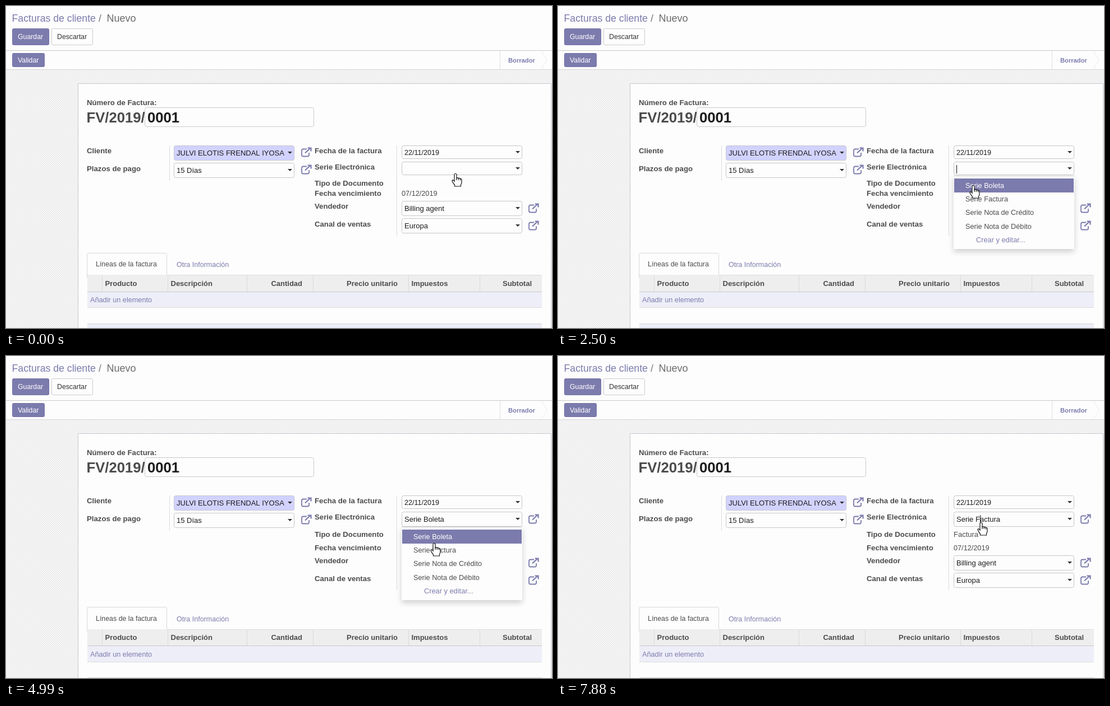
An HTML page with a canvas that plays this animation: 973 px wide and 575 px high, repeating every 8000 ms.

```html
<!DOCTYPE html>
<html lang="es">
<head>
<meta charset="utf-8">
<title>Factura</title>
<style>
  html, body { margin: 0; width: 100%; height: 100%; overflow: hidden; background: #fdfdfd; }
  canvas { display: block; }
</style>
</head>
<body>
<canvas id="stage" width="973" height="575"></canvas>
<script>
const ctx = document.getElementById("stage").getContext("2d");
const LOOP = 8000, TICK = 131.15, BLINK = 530;
const PURPLE = "#7c7bad", INK = "#4c4c4c", DARK = "#1c1c1c", WHITE = "#fdfdfd";

// Pointer path: tick, x, y of the hot spot
const path = [
  [0, 801, 299], [4, 766, 311], [7, 736, 289], [14, 736, 289], [17, 740, 320],
  [22, 740, 320], [25, 694, 331], [27, 708, 317], [29, 750, 312], [30, 758, 305],
  [32, 756, 294], [35, 757, 305], [38, 763, 334], [40, 763, 341], [41, 762, 342.5],
  [45, 726, 320], [48, 736, 317], [51, 732, 319], [55, 751, 310], [57, 751, 310],
  [59, 752, 297], [60, 754, 297]
];
// Tick from which the text caret restarts, and its x
const carets = [[11, 710], [20, 780], [33, 780], [41, 787], [60, 752]];

function rect(x, y, w, h, color) {
  ctx.fillStyle = color;
  ctx.fillRect(x, y, w, h);
}

function box(x, y, w, h, fill, border, radius = 3) {
  ctx.beginPath();
  ctx.roundRect(x + .5, y + .5, w - 1, h - 1, radius);
  ctx.fillStyle = fill;
  ctx.fill();
  ctx.lineWidth = 1;
  ctx.strokeStyle = border;
  ctx.stroke();
}

// y is the middle of the capitals
function text(str, x, y, color = INK, size = 13, weight = "", align = "left") {
  ctx.font = `${weight} ${size}px "Liberation Sans", Arial, sans-serif`;
  ctx.fillStyle = color;
  ctx.textAlign = align;
  ctx.fillText(str, x, Math.round(y + size * .36));
}

const label = (str, x, y) => text(str, x, y, INK, 13.2, "bold");

function button(str, x, y, w, h, fill, border, color) {
  box(x, y, w, h, fill, border, 2);
  text(str, x + 10, y + h / 2, color, 12.3);
}

function field(x, y, h, value, fill = WHITE, size = 13) {
  box(x, y, 215, h, fill, "#c6c6cc");
  text(value, x + 5, y + h / 2, DARK, size);
  const ax = x + 207, ay = y + Math.floor(h / 2) - 2;
  ctx.fillStyle = "#333";
  ctx.beginPath();
  ctx.moveTo(ax - 4, ay);
  ctx.lineTo(ax + 4, ay);
  ctx.lineTo(ax, ay + 4);
  ctx.fill();
}

const linkBox = new Path2D("M10 3.5H3.5Q1 3.5 1 6V14Q1 16.5 3.5 16.5H11.5Q14 16.5 14 14V10");
const linkArrow = new Path2D("M7 10.5L16 2M11.5 1.5H17.5V7.5");
function linkIcon(x, y) {
  ctx.save();
  ctx.translate(x, y);
  ctx.strokeStyle = PURPLE;
  ctx.lineWidth = 1.8;
  ctx.stroke(linkBox);
  ctx.lineWidth = 2.2;
  ctx.stroke(linkArrow);
  ctx.restore();
}

function makeHatch() {
  const tile = document.createElement("canvas");
  tile.width = tile.height = 4;
  const c = tile.getContext("2d");
  c.fillStyle = "#f7f7f7";
  c.fillRect(0, 0, 4, 4);
  c.fillStyle = "#ececec";
  c.fillRect(0, 0, 2, 2);
  c.fillRect(2, 2, 2, 2);
  return ctx.createPattern(tile, "repeat");
}
const hatch = makeHatch();

function drawHeader() {
  rect(0, 0, 973, 113, WHITE);
  text("Facturas de cliente", 10.5, 22, PURPLE, 17.7);
  text("/", 165, 22, "#777", 17.7);
  text("Nuevo", 179.5, 22, "#6b6b6b", 18);
  button("Guardar", 11, 40, 66, 30, PURPLE, "#7574a7", "#fff");
  button("Descartar", 81, 40, 74, 30, WHITE, "#cbcbcb", "#333");
  rect(0, 79, 973, 1, "#cacaca");
  button("Validar", 11, 84, 58, 25, PURPLE, "#7574a7", "#fff");
  rect(880, 80, 1, 33, "#dedede");
  text("Borrador", 895, 96.5, PURPLE, 11.2, "bold");
  ctx.strokeStyle = "#ececec";
  ctx.lineWidth = 1;
  ctx.beginPath();
  ctx.moveTo(954, 80);
  ctx.lineTo(964, 96.5);
  ctx.lineTo(954, 113);
  ctx.stroke();
  rect(0, 113, 973, 1, "#d6d6d6");
}

// Choosing a series makes the lower rows move down
function drawSheet(kind) {
  const dy = kind ? 8 : 0;
  rect(0, 114, 973, 461, hatch);
  box(128, 138, 844, 450, WHITE, "#c8c8d3", 0);

  label("Número de Factura:", 144, 172);
  text("FV/2019/", 143.5, 199, INK, 25.7, "bold");
  box(247, 181, 302, 35, WHITE, "#cacaca");
  text("0001", 252, 199, DARK, 25.7, "bold");

  label("Cliente", 144, 258.5);
  label("Plazos de pago", 144, 290);
  rect(291, 249, 1, 63, "#dcdcdc");
  field(299, 249, 27, "JULVI ELOTIS FRENDAL IYOSA", "#d2d2ff");
  field(299, 280, 27, "15 Días");
  linkIcon(526, 252);
  linkIcon(526, 283);

  label("Fecha de la factura", 550, 258.5);
  label("Serie Electrónica", 550, 287);
  label("Tipo de Documento", 550, 316.5 + dy / 4);
  label("Fecha vencimiento", 550, 334 + dy);
  label("Vendedor", 550, 357.5 + dy);
  label("Canal de ventas", 550, 389 + dy);
  rect(696, 249, 1, 161 + dy, "#dcdcdc");
  field(705, 249, 24, "22/11/2019", WHITE, 12.6);
  field(705, 278, kind ? 27 : 24, kind && "Serie " + kind);
  if (kind) linkIcon(931, 282);
  text(kind, 705, 318.5);
  text("07/12/2019", 705, 334 + dy, INK, 12.7);
  field(705, 348 + dy, 27, "Billing agent");
  field(705, 379 + dy, 27, "Europa");
  linkIcon(931, 352 + dy);
  linkIcon(931, 383 + dy);

  drawLines(dy);
}

function drawLines(dy) {
  const top = 480 + dy, bottom = dy ? 517 : 510, next = dy ? 574 : 567;
  box(144, 441 + dy - (dy ? 1 : 0), 143, 45, WHITE, "#d8d8d8", 2);
  text("Líneas de la factura", 160, 461 + dy, INK, 12.4);
  text("Otra Información", 304, 461 + dy, PURPLE, 12.5);

  rect(145, top, 810, bottom - top, "#eeeeee");
  rect(287, top, 668, 1, "#dcdcdc");
  for (const x of [171, 288, 429, 547, 717, 844]) rect(x, top, 1, bottom - top, "#dadada");
  const y = (top + bottom) / 2;
  const head = (str, x, align) => text(str, x, y, INK, 13, "bold", align);
  head("Producto", 176.5);
  head("Descripción", 293.5);
  head("Cantidad", 528, "right");
  head("Precio unitario", 698, "right");
  head("Impuestos", 722.5);
  head("Subtotal", 937, "right");
  rect(145, bottom, 810, 1, "#c9c9c9");
  rect(145, bottom + 1, 810, 537 + dy - bottom, "#eeeef8");
  rect(145, 538 + dy, 810, 1, "#dcdcdc");
  text("Añadir un elemento", 150, 524 + dy, PURPLE, 12.7);
  rect(145, next, 810, 1, "#d2d2d2");
  rect(145, next + 1, 810, 574 - next, "#eeeef8");
}

function drawMenu(dy, active) {
  ctx.save();
  ctx.shadowColor = "rgba(0,0,0,.18)";
  ctx.shadowBlur = 10;
  ctx.shadowOffsetY = 5;
  rect(705, 303 + dy, 215, 131, WHITE);
  ctx.restore();
  rect(705, 303 + dy, 215, 1, "#d4d4d4");
  rect(706, 308 + dy + active * 24, 213, 25, PURPLE);
  ["Boleta", "Factura", "Nota de Crédito", "Nota de Débito"].forEach((name, i) =>
    text("Serie " + name, 726, 320.5 + dy + i * 24.2, i === active ? "#fff" : INK, 12.7));
  text("Crear y editar...", 745, 417.5 + dy, PURPLE, 12.8);
}

const handShape = new Path2D("M-2 2Q-2 .5 0 .5T2 2V8Q4 7 5.3 8.5Q7.3 7.8 8.5 9.5Q11 9 11 12V16Q11 18 9.5 20V23H-1.5V20.5Q-4 18-5.5 14.5Q-6.5 12.5-5 11.7Q-3.5 11.5-2 14Z");
const handLines = new Path2D("M2 8V12M5.3 8.5V12M8.5 9.5V12.5");
const arrowShape = new Path2D("M.5 .5V16.5L4.2 13L6.8 19L9.3 18L6.7 12H11.5Z");
const beamShape = new Path2D("M-4 -7H-1.5L0 -6L1.5 -7H4M0 -6V6M-4 7H-1.5L0 6L1.5 7H4");

function drawPointer(x, y, shape) {
  ctx.save();
  ctx.translate(x, y);
  ctx.lineWidth = 1.2;
  ctx.strokeStyle = "#111";
  ctx.fillStyle = "#fff";
  if (shape !== beamShape) ctx.fill(shape);
  ctx.stroke(shape);
  if (shape === handShape) ctx.stroke(handLines);
  ctx.restore();
}

function pointerAt(tick) {
  const next = Math.max(1, path.findIndex(p => p[0] >= tick));
  const [t0, x0, y0] = path[next - 1], [t1, x1, y1] = path[next];
  const k = (tick - t0) / (t1 - t0);
  return [x0 + (x1 - x0) * k, y0 + (y1 - y0) * k];
}

function pointerShape(x, y, menuOpen, kind) {
  if (menuOpen || y < 304) return handShape;
  const overKind = kind && y > 311 && y < 326 && x > 704 && x < (kind === "Boleta" ? 742 : 749);
  const overDate = y > 335 && y < 350 && x > 704 && x < 769;
  return overKind || overDate ? beamShape : arrowShape;
}

function drawCaret(tick) {
  const caret = carets.findLast(c => c[0] <= tick);
  if (!caret) return;
  const [start, x] = caret;
  const phase = Math.floor(((tick - start) * TICK + 12) / BLINK);
  if (phase % 2 === 0) rect(x, 284, 1, 15, "#111");
}

function draw(time) {
  const tick = Math.min(60, Math.floor((time % LOOP + 8) / TICK));
  const kind = tick < 20 ? "" : tick < 41 ? "Boleta" : "Factura";
  const menuOpen = tick >= 12 && tick < 20 || tick >= 33 && tick < 41;

  drawHeader();
  drawSheet(kind);
  if (menuOpen) drawMenu(kind ? 2 : 0, tick >= 39 ? 1 : 0);
  drawCaret(tick);

  const [x, y] = pointerAt(tick);
  drawPointer(x, y, pointerShape(x, y, menuOpen, kind));
}

function frame() {
  draw(performance.now());
  requestAnimationFrame(frame);
}
frame();
</script>
</body>
</html>
```
